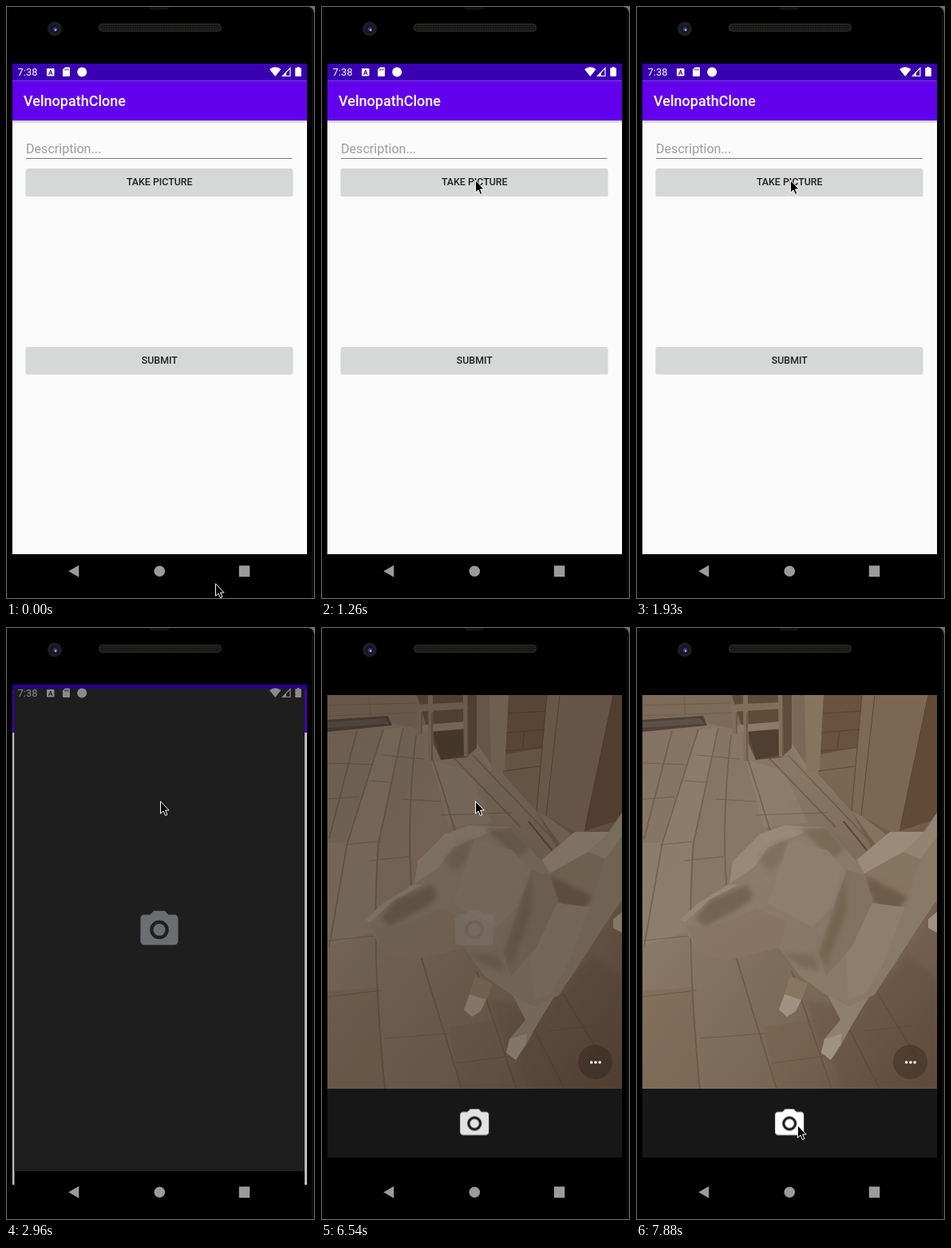
An HTML page that plays this animation: 387 by 741 pixels, repeating every 8 s.

```html
<!DOCTYPE html>
<html lang="en">
<head>
<meta charset="utf-8">
<title>Camera app demo</title>
<style>
html, body { margin: 0; width: 100%; height: 100%; overflow: hidden; background: #000; }
svg { display: block; width: 100vw; height: 100vh; font-family: Roboto, sans-serif; }
.medium { font-weight: 500; }
.label { font-size: 12.4px; font-weight: 500; fill: #202020; text-anchor: middle; }
.home, .opening, .waiting, .preview, .fade, .ripple, .shutter, .cursor {
  animation: 8s step-end infinite;
}
.home { animation-name: home; }
.opening { animation-name: opening; }
.waiting { animation-name: waiting; }
.preview { animation-name: preview; }
.fade { animation-name: fade; }
.ripple { animation-name: ripple; }
.shutter { animation-name: shutter; }
.cursor { animation-name: cursor; }
@keyframes home { 0% { opacity: 1 } 37%, 100% { opacity: 0 } }
@keyframes opening { 0% { opacity: 0 } 37% { opacity: 1 } 40.5%, 100% { opacity: 0 } }
@keyframes waiting { 0% { opacity: 0 } 40.5% { opacity: 1 } 81.75%, 100% { opacity: 0 } }
@keyframes preview { 0% { opacity: 0 } 81.75%, 100% { opacity: 1 } }
@keyframes fade { 0% { opacity: 0 } 81.75% { opacity: 1 } 83.25%, 100% { opacity: 0 } }
@keyframes shutter { 0% { opacity: .88 } 83.25%, 100% { opacity: 1 } }
@keyframes ripple { 0% { opacity: 0 } 20.75% { opacity: .06 } 22.25% { opacity: .12 } 24.125%, 100% { opacity: 0 } }
@keyframes cursor {
  0% { transform: translate(262px, 721px) }
  1.875% { transform: translate(254px, 709px) }
  3.375% { transform: translate(238px, 682px) }
  5.25% { transform: translate(215px, 633px) }
  7.125% { transform: translate(203px, 570px) }
  9.125% { transform: translate(195px, 468px) }
  10.875% { transform: translate(194px, 368px) }
  12.375% { transform: translate(194px, 292px) }
  13.875% { transform: translate(194px, 243px) }
  15.75% { transform: translate(193px, 217px) }
  92.125% { transform: translate(195px, 246px) }
  93.625% { transform: translate(201px, 341px) }
  95.125% { transform: translate(207px, 462px) }
  96.625% { transform: translate(209px, 559px) }
  98.5%, 100% { transform: translate(202px, 622px) }
}
</style>
</head>
<body>
<svg viewBox="0 0 387 741" preserveAspectRatio="none">
  <defs>
    <path id="camera" fill-rule="evenodd" d="M9 2L7.17 4H4C2.9 4 2 4.9 2 6V18C2 19.1 2.9 20 4 20H20C21.1 20 22 19.1 22 18V6C22 4.9 21.1 4 20 4H16.83L15 2ZM12 17A5 5 0 0 1 12 7A5 5 0 0 1 12 17ZM12 15.2A3.2 3.2 0 0 0 12 8.8A3.2 3.2 0 0 0 12 15.2Z"/>
    <g id="status">
      <text x="14.5" y="87.3" font-size="13">7:38</text>
      <path fill-rule="evenodd" d="M52 78h7.500q1 0 1 1v7.500q0 1-1 1h-7.500q-1 0-1-1v-7.500q0-1 1-1ZM53 86h1.200l.5-1.400h2.200l.5 1.400h1.200l-2.200-6h-1.200ZM55.100 83.500l.7-2 .7 2Z"/>
      <path fill-rule="evenodd" d="M74 76.500h5q1 0 1 1v9.500q0 1-1 1h-7q-1 0-1-1v-7.500ZM73.500 78.500v2h1v-2ZM75.500 78.500v2h1v-2ZM77.500 78.500v2h1v-2Z"/>
      <circle cx="95.200" cy="82.500" r="6"/>
      <path d="M330 79Q337.200 73.500 344.400 79L337.200 88Z"/>
      <path fill-rule="evenodd" d="M356.500 76v12h-11.500ZM355.300 79l-4.300 4.500v3.500h4.300Z"/>
      <path d="M364.800 76h2.500v1.200h1.700q.8 0 .8.800v9.300q0 .8-.8.800h-6q-.8 0-.8-.8v-9.300q0-.8.800-.8h1.800Z"/>
    </g>
    <pattern id="mesh" width="3" height="3" patternUnits="userSpaceOnUse">
      <rect width="3" height="3" fill="#171715"/><circle cx="1.500" cy="1.500" r=".8" fill="#2a2a27"/>
    </pattern>
    <linearGradient id="barShadow" x2="0" y2="1">
      <stop stop-color="#000" stop-opacity=".22"/><stop offset="1" stop-color="#000" stop-opacity="0"/>
    </linearGradient>
    <linearGradient id="floor" x1="0" y1="0" x2="1" y2="1">
      <stop stop-color="#837261"/><stop offset=".35" stop-color="#897866"/>
      <stop offset=".7" stop-color="#796756"/><stop offset="1" stop-color="#644d3d"/>
    </linearGradient>
    <linearGradient id="coat" x2=".8" y2="1">
      <stop stop-color="#8f806f"/><stop offset="1" stop-color="#867665"/>
    </linearGradient>
    <filter id="soft"><feGaussianBlur stdDeviation="3"/></filter>
    <clipPath id="lens"><rect x="8" y="85" width="369" height="492"/></clipPath>
  </defs>

  <!-- phone -->
  <rect width="387" height="741"/>
  <rect x="383" y="10" width="3" height="730" fill="#0e0e0e"/>
  <path d="M378 0H387V12Q386 1 378 0Z" fill="#707070"/>
  <path d="M.5 741V.5H378Q386.500 1 386.500 12V740.500H0" fill="none" stroke="#707070"/>
  <path d="M179 1h26q-1 3.500-5 3.500h-16q-4 0-5-3.500Z" fill="#121212"/>
  <circle cx="61" cy="28.500" r="9" fill="#1e1e20"/>
  <circle cx="61" cy="28.500" r="5.500" fill="#14172b"/>
  <circle cx="61.500" cy="29" r="2.500" fill="#35437f"/>
  <circle cx="62.200" cy="30" r="1.200" fill="#a6b4e6"/>
  <rect x="116.500" y="22.500" width="153" height="9" rx="4" fill="url(#mesh)" stroke="#30302e"/>

  <g class="home">
    <rect x="8" y="72" width="369" height="613" fill="#fafafa"/>
    <rect x="8" y="143" width="369" height="4" fill="url(#barShadow)"/>
    <rect x="8" y="72" width="369" height="21.500" fill="#3900b1"/>
    <rect x="8" y="93.500" width="369" height="49.500" fill="#6200ee"/>
    <use href="#status" fill="#fff"/>
    <text class="medium" x="22" y="125.300" font-size="18" fill="#fff">VelnopathClone</text>
    <text x="25" y="184" font-size="16.100" fill="#9d9d9d">Description...</text>
    <rect x="25" y="190" width="333.500" height="1" fill="#777"/>
    <g fill="#d6d7d7">
      <rect x="24.500" y="204" width="335" height="34" rx="2" fill="#000" opacity=".14"/>
      <rect x="25" y="203" width="334" height="33" rx="2"/>
      <rect x="24.500" y="427" width="335" height="33.500" rx="2" fill="#000" opacity=".14"/>
      <rect x="25" y="426" width="334" height="33" rx="2"/>
    </g>
    <rect class="ripple" x="25" y="203" width="334" height="33" rx="2"/>
    <text class="label" x="192.300" y="224.200">TAKE PICTURE</text>
    <text class="label" x="192.300" y="446.800">SUBMIT</text>
  </g>

  <g class="opening">
    <rect x="8" y="72" width="369" height="60" fill="#4700ad"/>
    <rect x="8" y="72" width="369" height="7" fill="#2a0088"/>
    <rect x="8" y="132" width="369" height="565" fill="#bcbcbc"/>
    <rect x="10.500" y="77" width="363.500" height="620"/>
    <rect x="10.500" y="77" width="363.500" height="603" fill="#1e1e1e"/>
    <use href="#status" fill="#8b8b8b"/>
    <use href="#camera" fill="#6c6d70" transform="translate(163.700 350) scale(2.360)"/>
  </g>

  <g class="waiting">
    <rect x="8" y="72" width="369" height="613" fill="#1e1e1e"/>
    <use href="#camera" fill="#6c6d70" transform="translate(163.400 349.400) scale(2.400)"/>
  </g>

  <g class="preview">
    <g clip-path="url(#lens)">
      <rect x="8" y="85" width="369" height="492" fill="url(#floor)"/>
      <!-- planks -->
      <path d="M78 128L105 125 72 270 30 272ZM137 165L185 180 215 245 160 250ZM8 270L70 268 66 380 8 400Z" fill="#988774" opacity=".35"/>
      <path d="M8 455L72 450 80 577H8ZM160 500L225 490 255 577H175Z" fill="#69543f" opacity=".2"/>
      <g fill="none" stroke="#5a4939" stroke-width="1.800" opacity=".5">
        <path d="M45 130L10 265M78 128L33 270 10 400M103 126L72 270Q62 400 80 577"/>
        <path d="M119 135Q100 300 127 418L176 577M140 165Q155 210 168 255M165 162L250 250M190 160L300 275"/>
        <path d="M195 430L245 577M258 485L305 577M303 458L365 560"/>
        <path d="M8 170L66 172M60 192L88 194M30 272L72 268M76 160L130 165M8 215L48 212M100 215L150 218M60 292L110 287" stroke-width="1"/>
        <path d="M8 462L76 454M80 514L160 508M8 392L66 386M170 545L240 536M150 235L240 232M285 505L345 498" stroke-width="1"/>
      </g>
      <!-- back of the room -->
      <path d="M8 85H200V150L134 130 88 120 8 116Z" fill="#7d6b59"/>
      <path d="M8 98L118 95M8 111L120 107M60 85L62 110" stroke="#665441" fill="none" opacity=".6"/>
      <path d="M8 116L84 111 89 123 8 131Z" fill="#4c423b"/>
      <path d="M8 119L80 114 85 121 8 126Z" fill="#5d5147"/>
      <path d="M120 85H196V150L182 163 150 166 134 130Z" fill="#5e4b39"/>
      <path d="M140 129H180V160L150 166Z" fill="#503f30"/>
      <path d="M117 97L180 94 186 102 119 106Z" fill="#806d5a"/>
      <path d="M122 123L181 118V127L126 132Z" fill="#8c7b68"/>
      <path d="M120 103H126V134H121ZM134 85H140L141 167H135ZM178 85H184L185 162H179Z" fill="#826f5b"/>
      <path d="M139 107V167M184 85V162M126 107V133" stroke="#5c4936"/>
      <path d="M232 85H285L272 232 228 183Z" fill="#69533f"/>
      <path d="M228 160L279 150 272 232 228 183Z" fill="#7a6652"/>
      <path d="M234 108L283 105M232 132L281 128M230 155L277 151M228 180L274 174M255 130L252 152" stroke="#4f3d2d" opacity=".7"/>
      <path d="M195 85H213V182L195 152Z" fill="#7b6856"/>
      <path d="M211 85H235L230 179 213 182Z" fill="#87745f"/>
      <path d="M195 145L213 172V182L195 153Z" fill="#8d7b68"/>
      <!-- door frame -->
      <path d="M283 85H377V290L300 285 270 230Z" fill="#725d4b"/>
      <path d="M283 85H299L282 236 270 230Z" fill="#7d6955"/>
      <path d="M299 85H366L330 262 282 236Z" fill="#7c6755"/>
      <path d="M366 85H377V240L330 255Z" fill="#624a39"/>
      <path d="M299 85L282 236M366 85L331 250M283 85L270 230" stroke="#4e3c2c" fill="none" opacity=".7"/>
      <path d="M270 230L284 237 317 262 302 275Z" fill="#86735f"/>
      <path d="M260 243L290 280" stroke="#4c3929" stroke-width="2" opacity=".7"/>
      <!-- dog -->
      <path d="M210 465L275 478 340 410 377 440V577H260Z" fill="#49372a" opacity=".18" filter="url(#soft)"/>
      <path d="M193 436L215 446 208 464 200 480 189 487 179 478 186 459Z" fill="#88775f"/>
      <path d="M236 452L292 462 270 498 257 522 244 541 232 532 236 515 256 491Z" fill="#8f7f6d"/>
      <path d="M236 515L258 508 256 522 244 541 232 532ZM186 459L207 466 200 480 189 487 179 478Z" fill="#a09180"/>
      <path d="M366 365L377 356V382L366 376Z" fill="#a19280"/>
      <path d="M275 291L318 256 360 256 377 232V341L357 370 322 424 298 460 266 474 236 458 204 435 180 402Z" fill="#897967"/>
      <path d="M277 291L318 256 362 256 335 281 286 308Z" fill="#9b8c7a"/>
      <path d="M362 256L377 232V262L356 290 335 281Z" fill="#938472"/>
      <path d="M286 308L335 281 356 290 337 347 300 330Z" fill="#867561"/>
      <path d="M286 310L340 337 322 362 296 344Z" fill="#6d5b49" filter="url(#soft)"/>
      <path d="M296 345L337 350 310 420 288 458 265 466 262 400Z" fill="#8e7e6c"/>
      <path d="M180 402L230 412 262 400 266 470 236 458 204 435Z" fill="#8a7a68"/>
      <path d="M55 366L78 345 117 320 121 293 155 259 185 248 240 250 274 291 284 308 262 390 226 408 178 401 112 417 78 405 65 384Z" fill="url(#coat)"/>
      <path d="M121 293L155 259 185 248 240 250 212 256 165 276 148 300 117 321Z" fill="#988978"/>
      <path d="M205 251L240 250 262 278 245 288Z" fill="#75654f" opacity=".8" filter="url(#soft)"/>
      <path d="M155 288L176 270 192 264 181 293 165 307Z" fill="#75654f" opacity=".55" filter="url(#soft)"/>
      <path d="M74 364L94 341 140 322 146 338 130 351 86 374Z" fill="#6f5f4e" opacity=".85" filter="url(#soft)"/>
      <path d="M55 366L78 345 117 321 128 322 92 341 61 369Z" fill="#978876"/>
      <path d="M62 372L90 377 150 352 190 368 178 401 112 417 78 405Z" fill="#85745f" opacity=".6"/>
      <path d="M192 266L240 279 264 306 246 350 220 375 165 345Z" fill="#8f806e" opacity=".8"/>
      <path d="M264 304L286 310 297 342 270 400 238 436 229 408 246 356Z" fill="#827260"/>
      <path d="M262 306L250 350 229 408 238 424 264 355Z" fill="#69583f" opacity=".5" filter="url(#soft)"/>
      <path d="M180 405L224 410 230 430 206 425Z" fill="#6d5c4a" opacity=".5" filter="url(#soft)"/>
    </g>
    <circle cx="343.500" cy="543.500" r="21.500" fill="#3a2c22" opacity=".5"/>
    <g class="fade">
      <rect x="8" y="85" width="369" height="492" fill="#1e1a16" opacity=".22"/>
      <use href="#camera" fill="#827d76" opacity=".32" transform="translate(163.400 349.400) scale(2.400)"/>
    </g>
    <g fill="#fff"><circle cx="338.700" cy="544" r="1.800"/><circle cx="343.900" cy="544" r="1.800"/><circle cx="349.100" cy="544" r="1.800"/></g>
    <rect x="8" y="577" width="369" height="86" fill="#171717"/>
    <use class="shutter" href="#camera" fill="#fff" transform="translate(170.600 598.800) scale(1.800)"/>
  </g>

  <!-- navigation -->
  <g fill="#9b9b9b" transform="translate(.3 .2)">
    <path d="M78 706L91 698.500V713.500Z"/>
    <circle cx="192" cy="706" r="6.800"/>
    <rect x="291.500" y="699" width="13.500" height="14" rx=".5"/>
  </g>

  <g class="cursor">
    <path d="M.5 .8V16.200L4 13 6.500 18.500 9 17.500 6.600 12H11.200Z" fill="#000" stroke="#fff"/>
  </g>
</svg>
</body>
</html>
```
